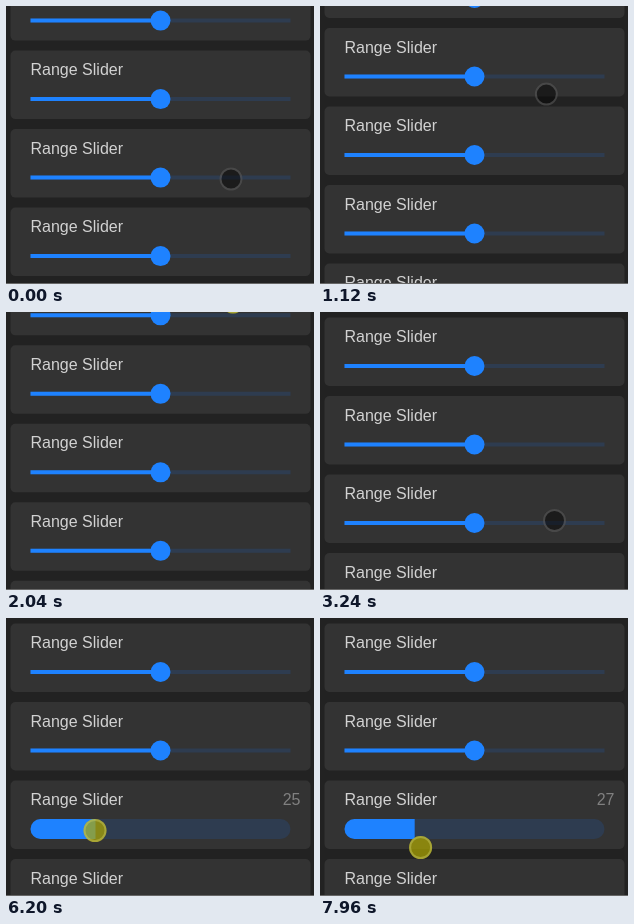
Animation of 308 by 278 pixels, one loop 8 s. Source, as an HTML page with a canvas:

```html
<!DOCTYPE html>
<html lang="en">
<head>
<meta charset="utf-8">
<title>Range sliders</title>
<style>
html, body { margin: 0; width: 100%; height: 100%; overflow: hidden; background: #222; }
canvas { display: block; }
</style>
</head>
<body>
<canvas id="stage" width="308" height="278"></canvas>
<script>
const ctx = document.getElementById('stage').getContext('2d');
const LOOP = 8000, TICK = 40, PITCH = 78.5, LEFT = 24.5, LENGTH = 260;
const BLUE = '#1e82ff', RAIL = '#2e3c50';
const DRAG = 6251, SWING = 810, LAG = 30, REST = 89;

function ease(t, from, to) {
  const p = Math.min(1, Math.max(0, (t - from) / (to - from)));
  return p * p * (3 - 2 * p);
}

function scrollAt(t) {
  return 274.6 - 101.1 * ease(t, 360, 920) - 173.5 * ease(t, 1640, 2176);
}

// Sideways swing of the final drag, in pixels.
function swing(t) {
  return t < DRAG ? 0 : 55 * (1 - Math.cos((t - DRAG) / SWING * 2 * Math.PI)) - 1;
}

function pointerAt(t) {
  const x = 225 + 2 * ease(t, 280, 1640) + 7.5 * ease(t, 2240, 3240)
    - (234.5 - REST) * ease(t, 3960, 4560) + swing(t);
  const y = 173 - 119 * ease(t, 280, 920) + 93 * ease(t, 960, 1350)
    - 187 * ease(t, 1640, 2176) + 248.5 * ease(t, 2440, 3240)
    + 4 * ease(t, 3960, 4560) - 6.5 * ease(t, 6200, 7000) + 23.5 * ease(t, 7000, 7800);
  return [x, y];
}

function pressed(t) {
  const during = (a, b) => t >= a && t < b;
  return during(280, 960) || during(1640, 2320) || during(3400, 3600)
    || during(4600, 4720) || t >= 5520;
}

function sliderState(t) {
  if (t >= DRAG) {
    // The bar trails the pointer slightly.
    const v = Math.round(25 + swing(t - LAG) * 100 / LENGTH);
    return [v, v, 1];
  }
  const value = 50 + 31 * ease(t, 3570, 3800) - 56 * ease(t, 4700, 4940);
  const label = t < 3600 ? '' : t < 4720 ? 81 : 25;
  return [value, label, ease(t, 5810, 6000)];
}

function box(x, y, w, h, radii, color) {
  ctx.fillStyle = color;
  ctx.beginPath();
  ctx.roundRect(x, y, w, h, radii);
  ctx.fill();
}

function disc(x, y, r, color) {
  ctx.fillStyle = color;
  ctx.beginPath();
  ctx.arc(x, y, r, 0, 2 * Math.PI);
  ctx.fill();
}

function write(text, x, y, color, align) {
  ctx.fillStyle = color;
  ctx.textAlign = align;
  ctx.fillText(text, x, y);
}

// grow: 0 is a thin rail with a thumb, 1 a thick bar without one.
function card(top, value, label, grow) {
  const y = top + 48.5, h = 4 + 16 * grow, r = 10 * grow, w = value * LENGTH / 100;
  box(4.5, top, 300, 68.5, 5, '#333');
  write('Range Slider', LEFT, top + 24.5, '#d2d2d2', 'left');
  write(label, 294.5, top + 24.5, '#808080', 'right');
  box(LEFT, y - h / 2, LENGTH, h, r, RAIL);
  box(LEFT, y - h / 2, w, h, [r, 0, 0, r], BLUE);
  if (grow < 1) disc(LEFT + w, y, 10 * (1 - grow), BLUE);
}

function pointer(x, y, down) {
  disc(x, y, 11.5, down ? 'rgba(175,168,0,.7)' : 'rgba(0,0,0,.47)');
  ctx.strokeStyle = down ? 'rgba(205,205,100,.45)' : 'rgba(255,255,255,.2)';
  ctx.lineWidth = 2;
  ctx.beginPath();
  ctx.arc(x, y, 10.5, 0, 2 * Math.PI);
  ctx.stroke();
}

function draw(t) {
  ctx.fillStyle = '#222';
  ctx.fillRect(0, 0, 308, 278);
  ctx.font = '16px "Liberation Sans", Arial, sans-serif';
  const top = 5.5 + scrollAt(t);
  for (let i = -5; i < 4; i++) {
    const state = i === 2 ? sliderState(t) : [50, '', 0];
    card(top + i * PITCH, ...state);
  }
  ctx.fillStyle = '#666';
  ctx.fillRect(0, 277, 308, 1);
  pointer(...pointerAt(t), pressed(t));
}

const start = performance.now();
function frame() {
  const t = (performance.now() - start) % LOOP;
  draw(Math.floor(t / TICK) * TICK);
  requestAnimationFrame(frame);
}
frame();
</script>
</body>
</html>
```
